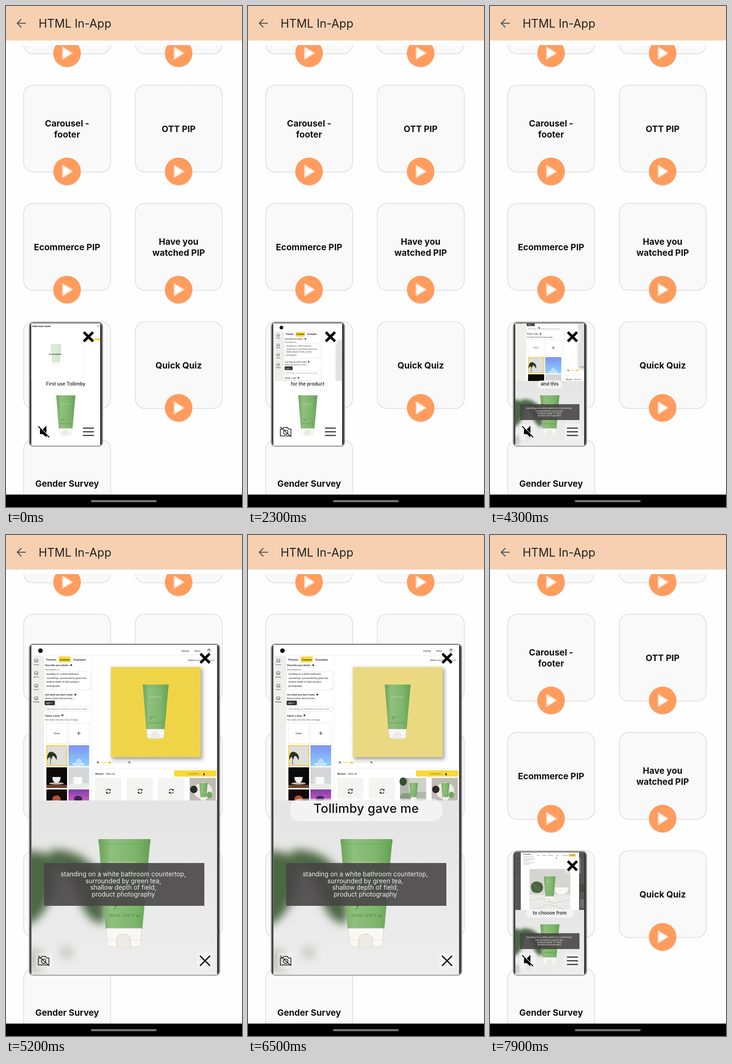
These frames come from a looping animation (514x1089 px, 8000 ms). An HTML page:

```html
<!DOCTYPE html>
<html lang="en">
<head>
<meta charset="utf-8">
<title>HTML In-App</title>
<style>
html, body { margin: 0; width: 100%; height: 100%; overflow: hidden; background: #fefefe; }
svg { display: block; width: 100vw; height: 100vh; }
text { font-family: Inter, "Open Sans", sans-serif; fill: #111; }
.mid { text-anchor: middle; }
.card { font-size: 19px; font-weight: 700; text-anchor: middle; }
.ui text { font-family: Lato, sans-serif; }
.b { font-weight: 700; }
.line { fill: none; stroke: #111; }
</style>
</head>
<body>
<svg viewBox="0 0 514 1089" preserveAspectRatio="none">
  <defs>
    <linearGradient id="skin"><stop offset="0" stop-color="#6ca35b"/><stop offset=".25" stop-color="#8fc07d"/><stop offset=".7" stop-color="#7eb56c"/><stop offset="1" stop-color="#64a054"/></linearGradient>
    <linearGradient id="room" x2="0" y2="1"><stop offset="0" stop-color="#e5e5e5"/><stop offset="1" stop-color="#ededed"/></linearGradient>
    <linearGradient id="sky" x2="0" y2="1"><stop offset="0" stop-color="#7f93f5"/><stop offset="1" stop-color="#8cd0fa"/></linearGradient>
    <linearGradient id="dusk" x2="0" y2="1"><stop offset="0" stop-color="#7a3fae"/><stop offset="1" stop-color="#e05fb8"/></linearGradient>
    <pattern id="checker" width="5" height="5" patternUnits="userSpaceOnUse"><path fill="#f4f4f4" d="M0 0h5v5H0z"/><path fill="#cfcfcf" d="M0 0h2.500v2.500H0zM2.500 2.500h2.500v2.500H2.500z"/></pattern>
    <filter id="blur" x="-50%" y="-50%" width="200%" height="200%"><feGaussianBlur stdDeviation="10"/></filter>
    <filter id="soft"><feGaussianBlur stdDeviation="4"/></filter>
    <clipPath id="screen"><path d="M55.500 239H459.500V956H55.500z"/></clipPath>
    <clipPath id="upper"><path d="M55 239H460V577H55z"/></clipPath>
    <clipPath id="lower"><path d="M55 577H460V957H55z"/></clipPath>
    <clipPath id="list"><path d="M0 85H514V1062H0z"/></clipPath>
    <g id="play">
      <circle cy="2" r="30" opacity=".08"/>
      <circle r="30" fill="#ff9c5e"/>
      <path d="M-9.500-13V13L11.500 0Z" fill="#fff" stroke="#ffd9c0" stroke-width="2.500" stroke-linejoin="round"/>
    </g>
    <g id="tube">
      <path d="M-57 2Q-57 0-54 0H54Q57 0 57 2L55 16 39 195H-41L-55 16Z" fill="url(#skin)"/>
      <path d="M-56 11H56" stroke="#5d9a4f" opacity=".6"/>
      <path d="M-40 194H37L35 232Q-2 240-36 232Z" fill="#f9f8f5" stroke="#d9d6cf"/>
      <path d="M-38 220H35" stroke="#dedbd4"/>
      <path d="M-17 235V216Q-12 206-2 206T13 216V235" fill="#eeebe6" stroke="#c9c5bc"/>
      <text class="mid" x="-4" y="57" font-size="13" letter-spacing="-.2" style="fill:#b4d6a2">hollumere</text>
      <path d="M-29 66H22M-29 74H15M-29 82H18M-29 90H8" stroke="#a9cf98" opacity=".6"/>
      <path class="line" d="M-24 155Q-16 145-12 136M-18 146Q-26 146-27 138Q-19 138-18 146M-16 143Q-7 145-5 138" style="stroke:#3f6d35"/>
      <text class="mid" y="169" font-size="7.500" style="fill:#477a3c">150 mL / 5.07 fl. oz</text>
    </g>
    <g id="spin" class="line" stroke-width="1.200">
      <path d="M-4.500-1A4.500 4.500 0 0 1 4-2M4.500 1A4.500 4.500 0 0 1-4 2M4.500-5V-2H1.500M-4.500 5V2H-1.500"/>
    </g>
    <path id="pointer" d="M0 0V5L1.300 4 2.200 6 3 5.600 2.200 3.700H3.700Z"/>
    <g id="lens" class="line"><circle r="1.700"/><path d="M1.200 1.200 2.800 2.800"/></g>
    <path id="pad" d="M-14-17.500H14Q17.500-17.500 17.500-14V14Q17.500 17.500 14 17.500H-14Q-17.500 17.500-17.500 14V-14Q-17.500-17.500-14-17.500" fill="#fff" opacity=".3"/>
  </defs>

  <path fill="#fefefe" d="M0 0H514V1089H0z"/>
  <g id="cards" clip-path="url(#list)"></g>
  <path fill="#f6d0b1" d="M0 0H514V75H0z"/>
  <path d="M43 37.500H25M33.500 28.500 24.500 37.500 33.500 46.500" class="line" stroke-width="2" style="stroke:#4b4a50"/>
  <text x="71" y="47" font-size="25" style="fill:#222">HTML In-App</text>
  <path d="M0 1062H514V1089H0z"/>
  <rect x="185" y="1074" width="143" height="4.500" rx="2.200" fill="#777"/>

  <rect id="frame" x="51" rx="8" fill="#343434" stroke="#8e8e8e" stroke-width="2.500"/>
  <g id="video"><g clip-path="url(#screen)">
    <path fill="#fff" d="M55 239H460V957H55z"/>
    <g clip-path="url(#upper)">
      <g id="app" class="ui"></g>
      <g id="upload" class="ui" transform="translate(55 240) scale(2.695) translate(-55 -690)">
        <path fill="#fff" d="M55 689H206V816H55z"/>
        <text class="b" x="57" y="698" font-size="6.200">Add new asset</text>
        <path class="line" stroke-width=".6" d="M199 694.500l3 3m0-3l-3 3"/>
        <path d="M169 730V815" stroke="#f3f3f3"/>
        <path d="M171 705H177M171 709H177M171 718H205" stroke="#ddd" stroke-width=".8"/>
        <path d="M171 722H206V727H171z" fill="#f8d93c"/>
        <use href="#tube" opacity=".3" transform="translate(109 735) scale(.205)"/>
        <text class="mid b" x="108" y="758.500" font-size="2.700">Removing background...</text>
      </g>
      <g id="detail" class="ui" transform="translate(55 240) scale(2.695) translate(-55 -690)"></g>
    </g>
    <g id="scene" clip-path="url(#lower)">
      <path fill="url(#room)" d="M55 577H460V957H55z"/>
      <g filter="url(#blur)">
        <path fill="#4c6842" d="M30 690Q75 680 105 705Q115 760 90 805Q65 850 30 850Z"/>
        <path fill="#4c6842" d="M95 685Q165 680 200 735Q222 790 214 845Q180 845 163 800Q150 735 95 715Z"/>
        <path fill="#c4c6c2" d="M120 895h24v25h-24zM45 900h35v50H45z"/>
      </g>
    </g>
    <use href="#tube" x="258" y="661"/>
    <g id="prompt">
      <path fill="#474545" opacity=".9" d="M83 713H432V806H83z"/>
    </g>
    <rect id="pill" y="573" height="49" rx="22" fill="#fff" opacity=".55"/>
    <text id="caption" class="mid" x="257.500" y="604" font-size="27" font-weight="500" letter-spacing=".3"></text>
  </g></g>

  <g id="close"><use href="#pad"/><path d="M-10-10 10 10M10-10-10 10" class="line" stroke-width="5.500" style="stroke:#000"/></g>
  <g id="size"><use href="#pad"/>
    <path id="menu" d="M-12-8H12M-12 0H12M-12 8H12" class="line" stroke-width="2.200"/>
    <path id="shrink" d="M-11-11 11 11M11-11-11 11" class="line" stroke-width="2.800"/>
  </g>
  <g transform="translate(82 925.500)"><use href="#pad"/>
    <g id="muted"><path d="M-8-5H-2L6-13V12L-2 5H-8Z"/><path d="M-11-12 13 12" stroke="#fff" stroke-width="3"/><path d="M-12-12 12 12" stroke="#000" stroke-width="2.200"/></g>
    <g id="camera" class="line" stroke-width="1.500"><path d="M-11.500-6H-6L-4-9.500H4L6-6H11.500V9H-11.500ZM-12-11 12 11"/><circle cy="1" r="4.800"/></g>
  </g>
</svg>
<script>
const $ = id => document.getElementById(id);
const text = (x, y, size, s, cls = '', fill = '#222') =>
  `<text x="${x}" y="${y}" font-size="${size}" class="${cls}" style="fill:${fill}">${s}</text>`;
const box = (x, y, w, h, fill, more = '') =>
  `<rect x="${x}" y="${y}" width="${w}" height="${h}" fill="${fill}" ${more}/>`;
const use = (id, x, y, scale = 1) => `<use href="#${id}" transform="translate(${x} ${y}) scale(${scale})"/>`;
const oval = (x, y, rx, ry, fill) => `<ellipse cx="${x}" cy="${y}" rx="${rx}" ry="${ry}" fill="${fill}"/>`;
const edge = 'stroke="#dedede" stroke-width=".7"';

// Card list
const labels = [['', ''], ['Carousel -|footer', 'OTT PIP'], ['Ecommerce PIP', 'Have you|watched PIP'],
  ['', 'Quick Quiz'], ['Gender Survey']];
$('cards').innerHTML = labels.map((row, r) => row.map((label, c) => {
  const x = 38.5 + c * 243, y = -85 + r * 257, lines = label.split('|');
  return box(x, y, 189.5, 189, '#f9f9f9', 'rx="21" stroke="#dcdcdc" stroke-width="1.5"') +
    lines.map((s, i) => text(x + 94.5, y + 102 + (i - (lines.length - 1) / 2) * 23.5, 19, s, 'card', '#111')).join('') +
    use('play', x + 94.5, y + 187.5);
}).join('')).join('');

// Photo editor page
const phrase = ['standing on a white bathroom', 'countertop, surrounded by green tea,', 'shallow depth of field, product', 'photography'];
const info = (x, y) => oval(x, y, 2.1, 2.1, '#222') + text(x, y + 1.5, 4, 'i', 'mid b', '#fff');
const photo = (x, back, props) => box(x, 528, 57, 49, back) + props + use('tube', x + 30, 539, .16);
const side = ['Create', 'Assets', 'Layers', 'Settings'].map((s, i) => {
  const y = 273 + i * 27.3;
  return box(62.5, y - 3, 7, 6, 'none', 'stroke="#333" stroke-width=".8" rx="1"') +
    `<path d="M63 ${y + 1}h6" stroke="#333" stroke-width=".7"/>` + text(66, y + 9.5, 4, s, 'mid');
}).join('');
$('app').innerHTML = box(40, 230, 430, 360, '#fff') + box(40, 262, 43, 330, '#eeeeec') +
  '<path d="M83 262H460M187.500 262V577M188 507H460" stroke="#ececec"/>' + oval(75, 251.5, 5, 5, '#111') +
  text(390, 254, 6.5, 'Home', 'mid') + text(417, 254, 6.5, 'Help', 'mid') +
  '<g class="line" stroke-width=".7"><circle cx="442" cy="251" r="3.500"/><circle cx="442" cy="250" r="1.300"/></g>' +
  text(425, 274, 5.7, 'Select another product', 'mid') + side +
  box(115, 264, 26, 12.5, '#f9d73c', 'rx="2"') +
  text(98, 272.5, 6.4, 'Themes', 'mid b') + text(128, 272.5, 6.4, 'Custom', 'mid b') + text(160.5, 272.5, 6.4, 'Examples', 'mid b') +
  text(85, 285, 5.6, 'Describe your photo', 'b') + info(142, 283) + text(85, 293.5, 4.6, 'Your product is...') +
  box(84, 296.5, 100.5, 40, '#fff', edge + ' rx="2"') + phrase.map((s, i) => text(88, 304 + i * 8.7, 5.4, s)).join('') +
  '<path d="M183 332l-3 3m3-1.200l-1.200 1.200" stroke="#777" stroke-width=".5"/>' +
  text(85, 349, 5.5, 'List what you don\'t want', 'b') + info(151, 347) + text(85, 357, 4.7, 'Reduce photos that are/have...') +
  box(84, 360, 22.5, 10, '#333', 'rx="2"') + text(87, 367, 5.5, 'ugly ×', '', '#fff') +
  box(84, 372, 100.5, 11, '#fff', edge + ' rx="2"') + text(88, 379.5, 5.2, 'Add things or attributes you don\'t want', '', '#888') +
  text(85, 394.5, 5.4, 'Match a style', 'b') + info(123, 392) + text(85, 402.5, 4.6, 'Use styles and colors from an image') +
  box(88, 409, 45, 44, '#fff', edge) + box(136, 409, 45, 44, '#fff', edge) +
  text(110.5, 433, 5.6, 'None', 'mid') + '<path d="M154.500 431h8m-4-4v8" stroke="#222"/>' +
  box(89, 458, 43.5, 43, '#dededc', 'stroke="#f2cb35" stroke-width="2"') +
  '<path d="M90 486Q91 469 101 472Q112 476 110 488Q101 472 99 487Q95 477 90 488M97 476V499" fill="#28351f" stroke="#28351f"/>' +
  box(136, 457, 45, 45, 'url(#sky)') + oval(158, 498, 14, 3.5, '#c9e5fb') + oval(159, 492, 6, 6, '#b7dcfa') +
  box(88, 505, 45, 45, '#0c0908') + oval(110, 540, 16, 2.5, '#c4b4a4') + '<path d="M101 526h18q0 12-9 13q-9-1-9-13" fill="#eee"/>' +
  '<path d="M88 543H133V550H88z" fill="#6b432c"/>' +
  box(136, 505, 45, 45, '#d5d6d7') + box(136, 540, 45, 10, '#e9e9e9') + '<path d="M147 526h19v13q-9 7-19 0z" fill="#fafafa"/><circle cx="147" cy="533" r="4" fill="none" stroke="#eee" stroke-width="1.500"/>' +
  box(88, 553, 45, 30, '#15090a') + oval(110, 574, 9, 8, '#b8503a') +
  box(136, 553, 45, 30, 'url(#dusk)') + oval(157, 573, 9, 6, '#3c2258') +
  box(231, 290, 197, 198, '#555', 'opacity=".55" filter="url(#soft)"') + box(228.5, 287, 195.5, 195.5, 'url(#checker)') +
  box(228.5, 287, 195.5, 195.5, '#f3d336', 'id="glow"') + use('tube', 326, 325, .5) +
  use('lens', 200, 494, .9) + use('lens', 268.5, 494, .9) +
  '<path d="M206 494.500H264" stroke="#ddd"/><path d="M206 494.500H226" stroke="#efc72f"/>' + oval(226, 494.5, 2.5, 2.5, '#efc72f') +
  text(194.5, 520.5, 5.8, 'Recent', 'b') + text(217, 520.5, 5.8, 'View all') +
  box(366, 511.5, 92, 13.5, '#f9d935', 'rx="2"') + text(410, 520.5, 5.5, 'LOADING...', 'mid', '#8b7528') +
  [194, 263, 331].map(x => box(x, 528, 57, 52, '#f4f4f3') + use('spin', x + 29, 557)).join('') +
  `<g id="shot2">${photo(263, '#a9aea9', box(263, 560, 57, 17, '#d5d6d4') + box(298, 531, 20, 32, '#e2e3e2') + oval(271, 555, 7, 10, '#7b8580'))}</g>` +
  `<g id="shot3">${photo(331, '#b3b8ad', box(350, 528, 38, 30, '#cfd1cb') + oval(338, 536, 8, 9, '#34502f') + oval(344, 569, 13, 8, '#8c9a83'))}</g>` +
  photo(400, '#bfbcb4', oval(429, 556, 20, 18, '#eeeae2') + oval(409, 553, 8, 8, '#292c29') + oval(443, 565, 6, 7, '#75a561')) +
  '<g id="cursor"><use href="#pointer"/></g>';

// Single result page
$('detail').innerHTML = box(54, 689, 153, 127, '#565656') + box(67, 689, 127, 127, '#fff') +
  [0, 1, 2, 3].map(i => box(58, 702 + i * 10, 4, 3, '#444')).join('') +
  box(196, 760, 10, 16, '#43483f') + box(196, 792, 10, 18, '#70706d') +
  text(73, 695.5, 3.2, 'Description', 'b') +
  ['standing on a white', 'bathroom countertop,', 'surrounded by green', 'tea, shallow', 'depth of field, product', 'photography'].map((s, i) => text(73, 699.5 + i * 3.3, 2.5, s)).join('') +
  ['Save', '♡ Delete', '⟳ Remix', '∕ Edit', '↓ Download'].map((s, i) => text([102, 112, 127, 143, 156][i], 697, 2.6, s, 'b')).join('') +
  box(172, 693, 15, 6, '#f5d13b', 'rx="1"') + text(179.5, 697, 2.4, 'Generate', 'mid b') + use('pointer', 144, 701, .5) +
  box(86, 726, 89, 90, '#d7d5d1') + box(86, 782, 89, 34, '#eceae7') +
  '<path d="M86 796l28-7 24 12 37-9M98 815l30-13 34 12" fill="none" stroke="#cac8c4"/>' +
  '<path d="M90 770Q86 754 102 753Q118 755 115 770Q112 779 102 778Q92 778 90 770" fill="#49653d"/><path d="M92 758L111 775" stroke="#829b73"/>' +
  '<path d="M141 766H171Q170 779 160 781H149Q141 778 141 766" fill="#f8f7f4"/>' + use('tube', 130, 742, .225);

$('prompt').innerHTML += ['standing on a white bathroom countertop,', 'surrounded by green tea,', 'shallow depth of field,', 'product photography']
  .map((s, i) => text(255.5, 742 + i * 14.6, 13.8, s, 'mid', '#eee')).join('');

// Start time, words, pill width
const captions = [[0, 'First use Tollimby', 320], [1200, 'for the product', 280], [3600, 'and this', 146], [4700, '', 0],
  [6200, 'Tollimby gave me', 332], [6900, 'a few options', 252], [7500, 'to choose from', 280]];
const show = (id, on) => $(id).style.display = on ? '' : 'none';
const set = (id, attrs) => { for (const k in attrs) $(id).setAttribute(k, attrs[k]); };
const move = (id, x, y) => set(id, { transform: `translate(${x} ${y})` });

function draw(t) {
  const big = t >= 4800 && t < 7600, zoomed = t < 4700;
  const p = Math.min(1, Math.max(0, (t - 3500) / 600)), scroll = 123 * p * p * (3 - 2 * p);

  set('frame', big ? { y: 237.5, width: 414, height: 719 } : { y: 688, width: 159, height: 268.5 });
  set('video', { transform: big ? '' : 'translate(55 690) scale(.371) translate(-55 -240)' });
  set('app', { transform: zoomed ? `translate(61 240) scale(2.097) translate(-55 ${-240 - scroll})` : '' });
  move('close', big ? 433.5 : 179.5, big ? 268 : 719);
  move('size', big ? 433.5 : 179.5, 925.5);
  show('menu', !big);
  show('shrink', big);

  const sound = big || t >= 1500 && t < 3700;
  show('camera', sound);
  show('muted', !sound);

  show('upload', t < 1200);
  show('detail', t >= 7500);
  show('scene', t >= 3600);
  show('prompt', t >= 3600);
  show('shot2', t >= 6900);
  show('shot3', t >= 6200);
  show('cursor', t >= 3500);
  move('cursor', zoomed ? 117.5 : 430, zoomed ? 249 + scroll : 517);
  set('glow', { opacity: zoomed ? 0 : .77 - .23 * Math.cos((t - 6400) / 900 * Math.PI) });

  const [, words, width] = captions.findLast(c => t >= c[0]);
  if ($('caption').textContent !== words) $('caption').textContent = words;
  set('pill', { x: 257.5 - width / 2, width });
}

function tick() {
  draw(performance.now() % 8000);
  requestAnimationFrame(tick);
}
tick();
</script>
</body>
</html>
```
